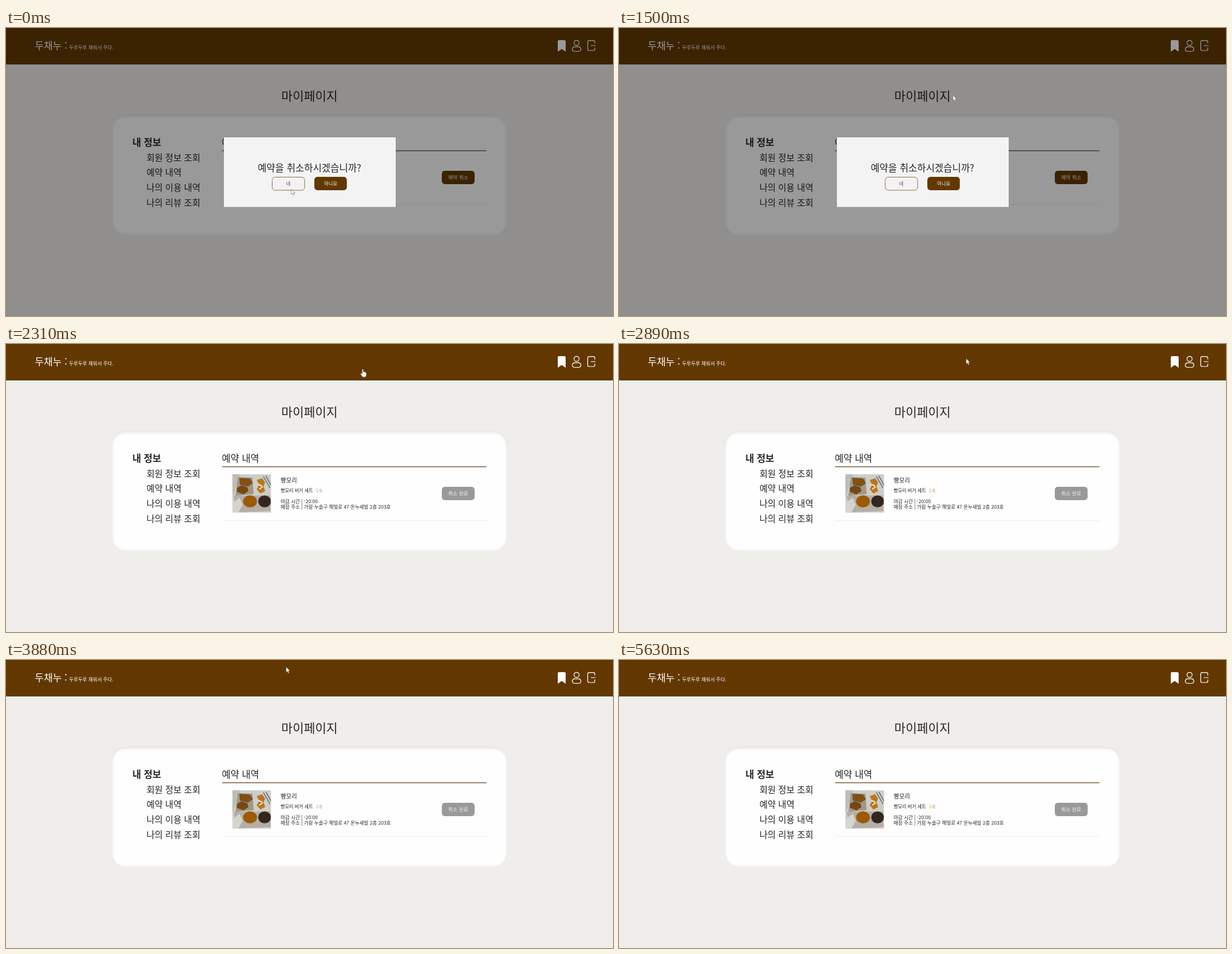
Recreate the animation shown at these times as an HTML page. Size 1000 by 474 pixels, loop 5650 ms.

```html
<!DOCTYPE html>
<html lang="ko">
<head>
<meta charset="utf-8">
<title>마이페이지</title>
<style>
  html, body { margin: 0; width: 100%; height: 100%; overflow: hidden; background: #f0eeea; }
  svg { display: block; width: 100%; height: 100%; }
  text { font-family: "Noto Sans CJK KR", "Noto Sans CJK", "Noto Sans", sans-serif; font-weight: 350; white-space: pre; }
  text.bold { font-weight: 700; }
</style>
</head>
<body>
<svg id="stage" viewBox="0 0 1000 474">
  <defs>
    <clipPath id="cardClip"><rect x="172.500" y="142" width="655" height="200.500" rx="24"/></clipPath>
    <clipPath id="photoClip"><rect x="373" y="214.500" width="63.500" height="63"/></clipPath>
    <filter id="soft" x="-5%" y="-10%" width="110%" height="120%"><feGaussianBlur stdDeviation="2"/></filter>
  </defs>

  <rect width="1000" height="474" fill="#f0eeea"/>
  <rect width="1000" height="60" fill="#623800"/>
  <g id="header" fill="#fff"></g>
  <path d="M909 22q0-2 2-2h9q2 0 2 2v17l-6.500-4.500-6.500 4.500z" fill="#fff"/>
  <g fill="none" stroke="#fff" stroke-width="1.200" stroke-linecap="round">
    <circle cx="940" cy="24.500" r="4.200"/>
    <path d="M936.500 30.800h7q3.500.700 3.500 4t-3.500 3.700h-7q-3.500-.400-3.500-3.700t3.500-4z"/>
    <path d="M970 25v-2q0-2.300-2.300-2.300h-7q-2.300 0-2.300 2.300v11.700q0 2.300 2.300 2.300h7q2.300 0 2.300-2.300v-2M964 29h6.800"/>
  </g>

  <g clip-path="url(#cardClip)">
    <rect x="172" y="142" width="656" height="201" fill="#fefefe"/>
    <rect x="172.500" y="143" width="655" height="200" rx="24" fill="none" stroke="#e2e0dd" stroke-width="4.500" filter="url(#soft)"/>
  </g>
  <g id="page" fill="#262626"></g>
  <path d="M356 202H791.500" stroke="#7d6748" stroke-width="1.400"/>
  <path d="M356 290.500H791.500" stroke="#efefef"/>

  <g clip-path="url(#photoClip)">
    <rect x="373" y="214" width="64" height="64" fill="#cfcdc7"/>
    <path d="M373 214h13l-9 28-4 10z" fill="#bdbdb7"/>
    <path d="M382 219l24 1 2 27-30 3z" fill="#a39684"/>
    <path d="M385 221l17 1 4 7-7 5-13-3z" fill="#85500f" stroke="#5b4a38"/>
    <path d="M381 237l7-4 9 3 2 6-8 5-10-4z" fill="#7a4710" stroke="#5b4a38"/>
    <path d="M413 224l9-3 5 7-3 6 3 8-8 4-6-7 4-7z" fill="#b97620"/>
    <path d="M416 231l6 3M417 239l6-4" stroke="#efe3c4" stroke-width="2"/>
    <path d="M375 250l60-1 1 26-56 2z" fill="#b5aea4"/>
    <path d="M373 262l12-9 5 12-7 12h-10z" fill="#d6d4d0"/>
    <ellipse cx="402" cy="259" rx="11.500" ry="10" fill="#9c5a06"/>
    <ellipse cx="426" cy="259" rx="10.500" ry="9.800" fill="#33261f"/>
    <path d="M424 218l11 19M428 217l9 16" stroke="#5c636b" stroke-width="1.400"/>
  </g>

  <rect id="action" x="718" y="235" width="54" height="22" rx="5"/>
  <g id="actionLabel"></g>

  <g id="modal">
    <rect width="1000" height="474" fill-opacity=".4"/>
    <rect x="359" y="180" width="283" height="114.500" fill="#f4f3f3"/>
    <rect x="438.500" y="245.500" width="53.500" height="21.500" rx="5" fill="none" stroke="#857a63"/>
    <rect x="508" y="245" width="53.500" height="22" rx="5" fill="#623800"/>
    <g id="question" fill="#262626"></g>
  </g>

  <g id="cursor" fill="#fff" stroke="#666" stroke-width=".6" stroke-linejoin="round">
    <path id="arrow" d="M0 0V8.600L2 6.900 3.500 10.300 4.900 9.700 3.500 6.400H6.200Z"/>
    <path id="hand" d="M-1.200 1Q-1.200 0 -.300 0T.700 1V4.300Q2 3.700 2.400 4.700 3.600 4.100 4 5.200 5.400 4.900 5.400 6.300V9Q5.400 10.800 4.300 12.700H-.800Q-1.700 10.700-3.600 8.400-4.200 7.300-3.300 6.900-2.400 6.600-1.200 8Z"/>
  </g>
</svg>
<script>
const LOOP = 5650, CLOSE = 2310;
const $ = id => document.getElementById(id);

// Adds a line of text centred vertically on cy.
function label(parent, str, x, cy, size, attrs = {}) {
  const el = document.createElementNS("http://www.w3.org/2000/svg", "text");
  const all = { x, y: cy + size * 0.38, "font-size": size, ...attrs };
  for (const key in all) el.setAttribute(key, all[key]);
  el.textContent = str;
  $(parent).append(el);
  return el;
}
const mid = { "text-anchor": "middle" };

label("header", "두채누 :", 47.5, 28.5, 16);
label("header", "두루두루 채워서 주다.", 104, 32, 8);

label("page", "마이페이지", 500, 112, 20.2, mid);
label("page", "내 정보", 208.3, 188, 15.6, { class: "bold" });
["회원 정보 조회", "예약 내역", "나의 이용 내역", "나의 리뷰 조회"]
  .forEach((item, i) => label("page", item, 231.4, 213 + i * 24.9, 14.6));
label("page", "예약 내역", 355.4, 188, 15.6);
label("page", "빵모리", 452.5, 224, 9.8);
label("page", "빵모리 버거 세트", 452.5, 241.3, 7.6);
label("page", "1개", 510.5, 241.3, 7.2, { fill: "#d39a5c" });
label("page", "마감 시간 | -20:00", 452.5, 259, 8);
label("page", "매장 주소 | 가람 누솔구 해빛로 47 온누새빌 2층 203호", 452.5, 268.3, 8);

const action = label("actionLabel", "", 745, 246.2, 8.4, { ...mid, fill: "#f2f2f2" });

label("question", "예약을 취소하시겠습니까?", 500, 230, 15.7, mid);
label("question", "네", 465.2, 256, 7.8, { ...mid, fill: "#555" });
label("question", "아니요", 534.8, 256, 7.8, { ...mid, fill: "#fff" });

// Pointer stops: time, x, y, shape from that time on.
const stops = [
  [0, 470, 265, "arrow"],
  [120, 469.5, 264.5, "hand"],
  [1190, 469, 264, "hand"],
  [1230, 473, 252, "arrow"],
  [1670, 588, 41.5, "hand"],
  [2710, 588, 41.5, "arrow"],
  [2890, 572, 24, "arrow"],
  [3030, 572, 24, "arrow"],
  [3130, 562, -12, "none"],
  [3290, 545, 0, "arrow"],
  [3340, 534.5, 180, "arrow"],
  [3380, 534, 184, "arrow"],
  [3520, 520, 205, "arrow"],
  [3790, 520, 205, "arrow"],
  [3880, 461.5, 11.5, "arrow"],
  [4200, 461.5, 11.5, "arrow"],
  [4330, 452, 22, "arrow"],
  [4520, 452, 22, "none"],
  [LOOP, 452, 22, "none"]
];

function pointer(t) {
  const i = stops.findIndex(s => s[0] > t) - 1;
  const [t0, x0, y0, shape] = stops[i], [t1, x1, y1] = stops[i + 1];
  const p = (t - t0) / (t1 - t0), e = p * p * (3 - 2 * p);
  return { x: x0 + (x1 - x0) * e, y: y0 + (y1 - y0) * e, shape };
}

const show = (id, on) => $(id).setAttribute("display", on ? "inline" : "none");

function draw(t) {
  const open = t < CLOSE;
  show("modal", open);
  $("action").setAttribute("fill", open ? "#623800" : "#999");
  action.textContent = open ? "예약 취소" : "취소 완료";

  const { x, y, shape } = pointer(t);
  $("cursor").setAttribute("transform", `translate(${x} ${y})`);
  show("arrow", shape === "arrow");
  show("hand", shape === "hand");
}

function tick() {
  draw(performance.now() % LOOP);
  requestAnimationFrame(tick);
}
tick();
</script>
</body>
</html>
```
